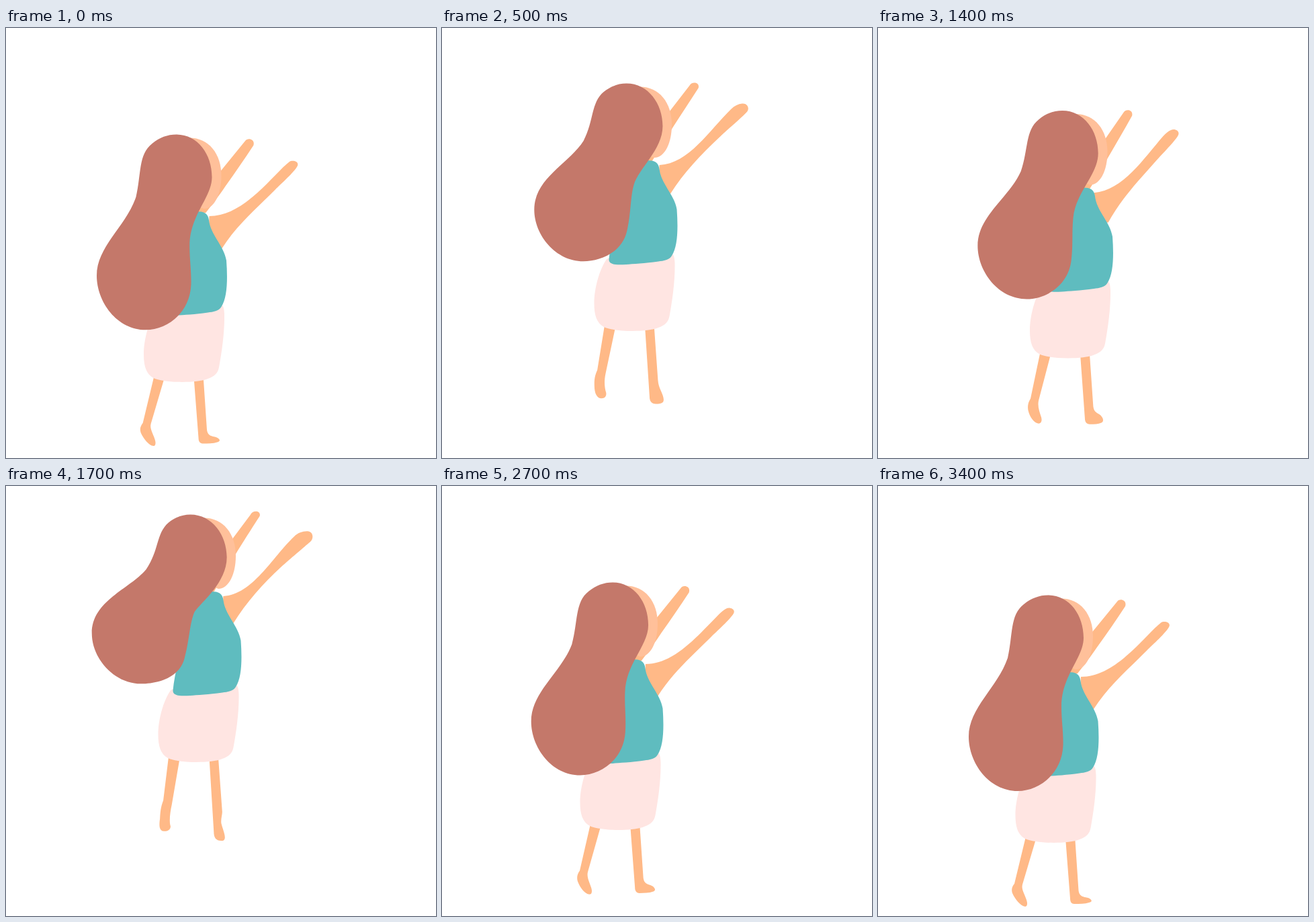
An HTML page for the animation above (3.9 s loop, 640 px wide and 640 px high).

```html
<!DOCTYPE html>
<html lang="en">
<head>
<meta charset="utf-8">
<title>Jumping girl</title>
<style>
  html, body { margin: 0; height: 100%; overflow: hidden; background: #fff; }
  svg { display: block; width: 100vw; height: 100vh; }
</style>
</head>
<body>
<svg viewBox="0 0 640 640"><g id="girl"></g></svg>
<script>
const STEP = 100;
const SKIN = '#ffb987';

// Each part: fill, standing path and, where it bends, the path in mid-air.
const parts = {
  backArm: {
    fill: SKIN,
    rest: 'M356 172C359 167 371 169 368 179C355 199 341 219 326 240C318 252 308 265 297 279L280 279L285 258L320 216Z',
    air: 'M345 165C348 158 361 159 358.5 168C345 189 333 207 320.5 227C310 246 298 265 289 279L280 279L280 255L317 201.5Z'
  },
  face: {
    fill: '#ffc09a',
    rest: 'M270 167.5C300 166 320 190 320 224C320 250 310 273 294 273L262 260Z'
  },
  frontArm: {
    fill: SKIN,
    rest: 'M302 284C345 284 380 244 412 211.5C416 208 419 205 421 203.5C426 200 437 203 433 210C428 219 410 235 400 245C368 277 343 298 321 332L300 330Z',
    air: 'M301.5 284C345 282 375 231 408 199C413 194 419 191.5 425 191C433 190 437 199 431 205C424 212 402 231 391 241C362 268 337 295 317.5 326L300 325Z'
  },
  leftLeg: {
    fill: SKIN,
    rest: 'M221 515L219 526L203 592C199 597 198.5 601 200 606C204 615 212 625 219 626C222 626 223 622 221 616C218 607 213 600 215 593L234 529L237 515Z',
    air: 'M221 515L219.5 526L210 589C206 598 205.5 605 205.5 613C205 625 208 632 215 632C220 632 223 629 222.5 624C220 617 220 605 222.5 594L235.5 529L238 515Z'
  },
  rightLeg: {
    fill: SKIN,
    rest: 'M278.5 515L279.5 530L286 614C286 619 288 622 292 622C300 622 308 622 314 620C319 619 319 616 314 613.5C308 611 300 613 298.5 602L293.5 528L293 515Z',
    air: 'M279.5 515L280.5 529L287 630C287 638 290 642 297 642C301 642 304 641.5 306 639C308 635 305 628 302 620C300 614 300 610 299.5 604L294 527L293 515Z'
  },
  skirt: {
    fill: '#ffe5e2',
    rest: 'M223 424C212 440 204.5 468 204.5 490C204.5 507 208 519 219 525C235 532.5 283 533 300 526C311 522 315 517 316.5 509C321 485 325 455 324.5 430C324 420 323 416 318 416L240 416Z'
  },
  top: {
    fill: '#5fbcbf',
    rest: 'M280 277C294 276.5 300 279 301.5 290C304 312 324 328 327.5 350C329.5 378 329 405 320 419C316 425.5 308 426.5 300 427.5C280 430.5 262 431 252 432C235 433 226 432 226.5 424C228 408 232 390 237 370L240 310L268 285Z'
  },
  hair: {
    fill: '#c4786a',
    rest: 'M253 162.5C285 162.5 306 192 306 226C306 256 273 282 273 328C273 350 276 365 275.5 386C274 428 240 454 208 454C165 454 135 412 135 373C135 330 178 300 193 256C201 222 196 192 217 176C228 167 240 162.5 253 162.5Z',
    air: 'M252.5 162.5C285 162.5 306.5 193 306.5 226C306.5 262 270 290 262 312C256 330 257 355 250 382C242 412 210 423.5 185.5 423.5C145 423.5 112.5 385 112.5 347C112.5 300 165 280 188 247C205 217 200 191 219 175C229 167 240 162.5 252.5 162.5Z'
  }
};

// Poses, one per step: rise, shift, extra swing of the arms.
const home = [0, 0, 0];
const away = [1, 19, 0];
const hold = (pose, n) => Array(n).fill(pose);
const poses = [
  [4, 0.5, 0], [40, 8, 2], [89, 16.5, 0], [119, 20, 0],
  [115, 21, 0], [80, 22, 0], [33, 22, 1],
  ...hold(away, 7),
  [39.5, 21.5, 4], [88, 22, 3], [118, 22, 1], [120, 22, 0],
  [82, 14, 0], [31, 6, 1],
  ...hold(home, 7),
  [19, 1, 0], [68, 4, 0], [116, 7, 0], [144, 8, 0],
  [108, 6, 0], [36, 3, 1], [5, 0.5, 0],
  ...hold(home, 5)
];

const girl = document.getElementById('girl');
const number = /-?\d+(\.\d+)?/g;

for (const part of Object.values(parts)) {
  part.el = document.createElementNS('http://www.w3.org/2000/svg', 'path');
  part.el.setAttribute('fill', part.fill);
  part.el.setAttribute('d', part.rest);
  part.goal = part.air && part.air.match(number).map(Number);
  girl.append(part.el);
}

function morph(part, k) {
  let i = 0;
  return part.rest.replace(number, n => (+n + (part.goal[i++] - n) * k).toFixed(2));
}

function draw([rise, shift, swing]) {
  const bend = Math.min((rise / 89) ** 1.25, 1.3);
  girl.setAttribute('transform', `translate(${shift} ${-rise})`);
  parts.backArm.el.setAttribute('transform', `rotate(${-swing} 290 285)`);
  parts.frontArm.el.setAttribute('transform', `rotate(${-swing} 310 310)`);
  for (const part of Object.values(parts)) {
    if (part.goal) part.el.setAttribute('d', morph(part, bend));
  }
}

const start = performance.now();
let shown = null;

function tick() {
  const step = Math.floor((performance.now() - start) / STEP) % poses.length;
  if (poses[step] !== shown) draw(shown = poses[step]);
  requestAnimationFrame(tick);
}
tick();
</script>
</body>
</html>
```
